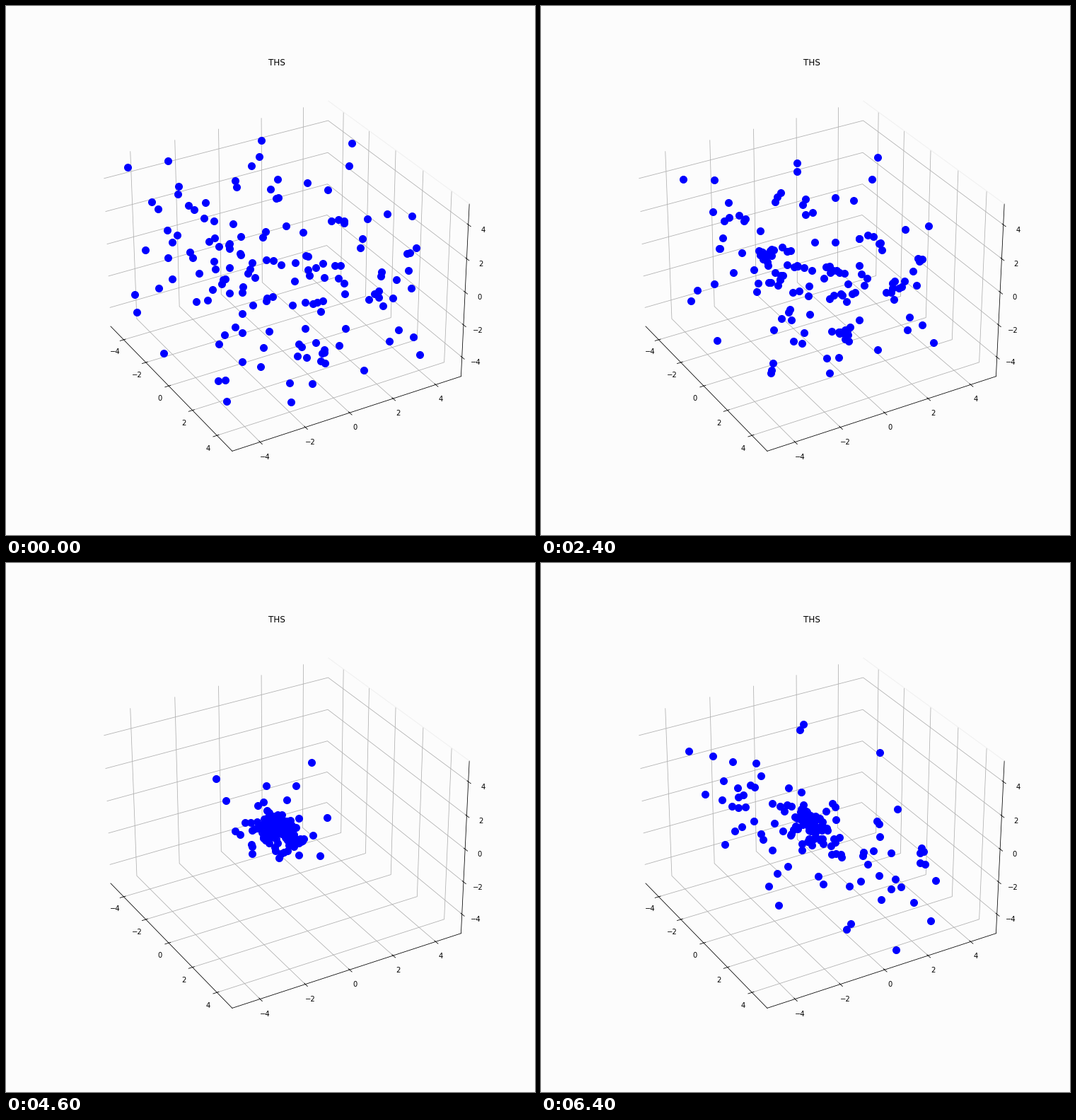
Recreate the animation shown at these times as a matplotlib script. Size 748 by 748 pixels, loop 6500 ms.

```python
import numpy as np
import matplotlib.pyplot as plt
from matplotlib.animation import FuncAnimation

SIZE, DPI = 748, 72
FRAMES, INTERVAL = 65, 100
BACK = "#fcfcfc"

COUNT = 150
BOX = 5.0                 # half side of the starting cube
LIM = BOX * 25 / 24       # half side of the drawn axes

# Gravity: a cold uniform cloud that falls together after FALL seconds
FALL = 4.1
GM = 3 * np.pi * (2 * BOX) ** 3 / (32 * FALL ** 2) / COUNT
SOFT = 0.15
SUBSTEPS = 12


def pull(pos):
    gap = pos[None, :, :] - pos[:, None, :]
    dist2 = np.einsum("ijk,ijk->ij", gap, gap) + SOFT ** 2
    return GM * np.einsum("ijk,ij->ik", gap, dist2 ** -1.5)


def simulate():
    """Star positions for every frame, by leapfrog steps."""
    rng = np.random.default_rng(1)
    pos = rng.uniform(-BOX, BOX, (COUNT, 3))
    vel = np.zeros_like(pos)
    acc = pull(pos)
    dt = INTERVAL / 1000 / SUBSTEPS
    path = [pos]
    for _ in range(FRAMES - 1):
        for _ in range(SUBSTEPS):
            vel += acc * dt / 2
            pos = pos + vel * dt
            acc = pull(pos)
            vel += acc * dt / 2
        path.append(pos)
    return path


PATH = simulate()

fig = plt.figure(figsize=(SIZE / DPI, SIZE / DPI), dpi=DPI, facecolor=BACK)
ax = fig.add_subplot(projection="3d", facecolor=BACK)
ax.view_init(elev=30, azim=-30)
ax.set_title("THS")
ax.plot([-LIM, LIM], [LIM, LIM], [LIM, LIM], color="#f0f0f0", lw=1)
stars, = ax.plot([], [], [], "o", color="blue", ms=10)

for axis in (ax.xaxis, ax.yaxis, ax.zaxis):
    axis.pane.set_fill(False)
    axis.pane.set_edgecolor("none")
    axis.set_ticks(range(-4, 5, 2))
ax.set_xlim(-LIM, LIM)
ax.set_ylim(-LIM, LIM)
ax.set_zlim(-LIM, LIM)


def update(i):
    stars.set_data_3d(*PATH[i].T)
    return stars,


def reset():
    return update(0)


anim = FuncAnimation(fig, update, frames=FRAMES, init_func=reset,
                     interval=INTERVAL, repeat=True, repeat_delay=0)
plt.show()
```
